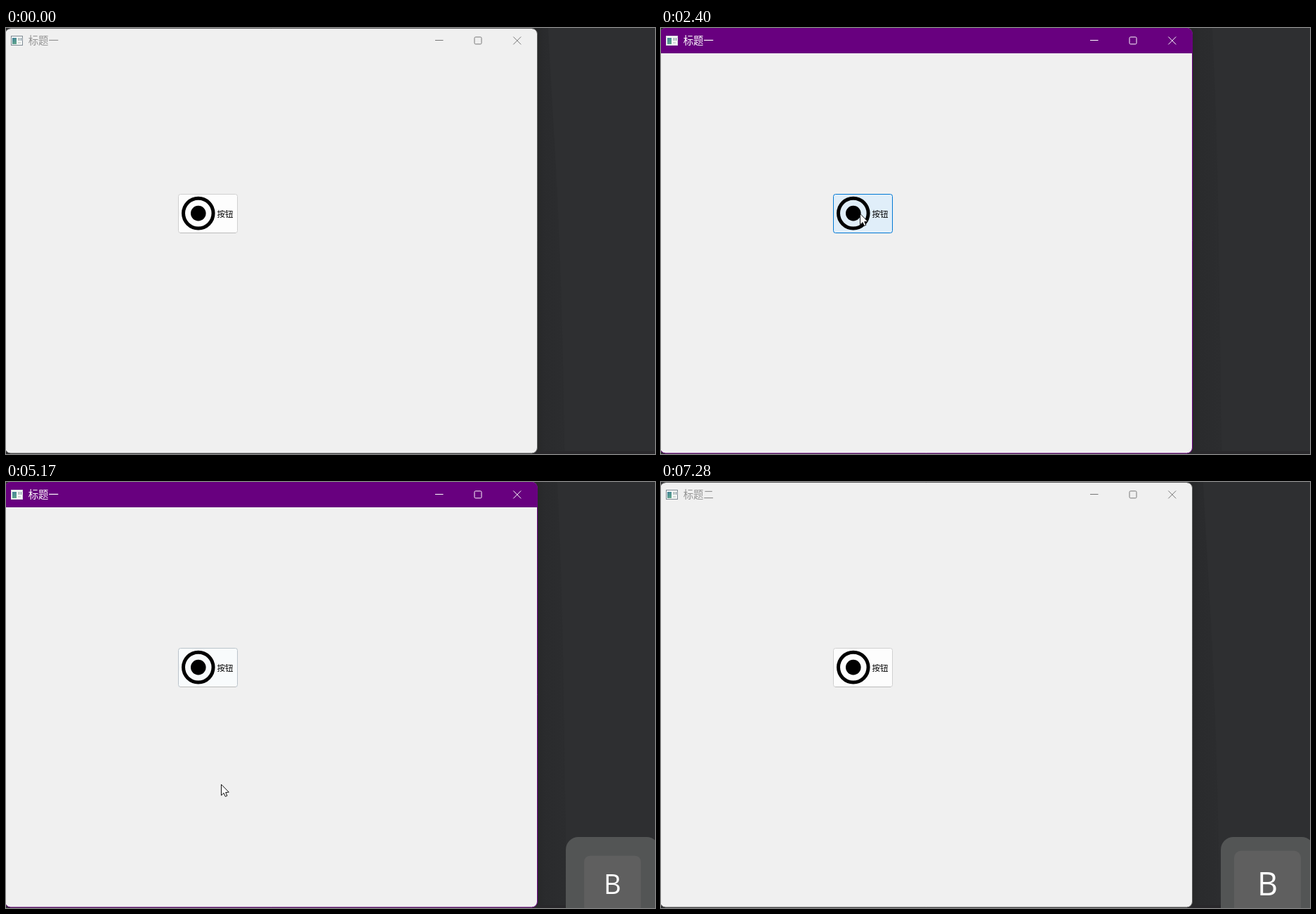
Write an HTML page with a canvas that moves like this. It is 924 px wide and 606 px high and loops after 7.3 s.

```html
<!DOCTYPE html>
<html lang="zh">
<head>
<meta charset="utf-8">
<style>
  html, body { margin: 0; width: 100%; height: 100%; overflow: hidden; background: #2e2f31; }
  canvas { display: block; }
</style>
</head>
<body>
<canvas id="stage" width="924" height="606"></canvas>
<script>
const ctx = document.getElementById('stage').getContext('2d');
const LOOP = 7300, ACTIVE_FROM = 1190, ACTIVE_TO = 7280;
const KEY_DOWN = 4810, KEY_UP = 6200;
const CJK = '"Noto Sans CJK SC", "Noto Sans CJK", sans-serif';

// Each click, including auto-repeats while held, swaps the title.
const clicks = [1700, 1760, 3230, 3330, 3440, 3570, 3670, 3820, 3920, 4010,
  4100, 4240, 4330, 4910, 5730, 5830, 5920, 6020, 6150, 6250, 6350];

const looks = {
  normal: { fill: [253, 253, 253], line: [208, 208, 208] },
  hover: { fill: [224, 238, 249], line: [0, 120, 212] },
  down: { fill: [204, 228, 247], line: [0, 84, 153] }
};

// Fade start, fade end, resulting look
const buttonFades = [
  [850, 1000, 'hover'], [1420, 1420, 'down'], [1760, 1760, 'hover'],
  [2930, 2930, 'down'], [4330, 4330, 'hover'], [4430, 4660, 'normal'],
  [4810, 4810, 'down'], [4910, 5200, 'normal'], [5400, 5550, 'down'],
  [6350, 6480, 'normal']
];

const pointerPath = [
  [330, 322, 588], [520, 296, 470], [710, 256, 350], [850, 243, 284],
  [1000, 284, 262], [2399, 284, 262], [2400, 283, 264], [2459, 283, 264],
  [2460, 281, 266], [2790, 281, 266], [3020, 284, 281], [3250, 282, 274],
  [4380, 282, 274], [4660, 306, 430], [6200, 306, 430], [6460, 322, 608]
];

const clamp = v => Math.max(0, Math.min(1, v));
const mix = (a, b, p) => a + (b - a) * p;
const rgb = c => `rgb(${c.map(Math.round).join()})`;

function box(x, y, w, h, r, fill, line) {
  ctx.beginPath();
  ctx.roundRect(x, y, w, h, r);
  if (fill) { ctx.fillStyle = fill; ctx.fill(); }
  if (line) { ctx.strokeStyle = line; ctx.stroke(); }
}

function rect(x, y, w, h, color) {
  ctx.fillStyle = color;
  ctx.fillRect(x, y, w, h);
}

function lines(color, ...segments) {
  ctx.strokeStyle = color;
  ctx.beginPath();
  for (const [x1, y1, x2, y2] of segments) {
    ctx.moveTo(x1, y1);
    ctx.lineTo(x2, y2);
  }
  ctx.stroke();
}

function text(str, x, y, font, color) {
  ctx.font = font;
  ctx.fillStyle = color;
  ctx.fillText(str, x, y);
}

function drawBackdrop(active) {
  rect(0, 0, 924, 606, '#2e2f31');
  const top = active ? 785 : 772, bottom = active ? 799 : 796;
  ctx.beginPath();
  ctx.moveTo(750, 0);
  ctx.lineTo(top, 0);
  ctx.bezierCurveTo(top + 8, 160, bottom - 5, 260, bottom, 606);
  ctx.lineTo(750, 606);
  const shade = ctx.createLinearGradient(756, 0, 800, 0);
  shade.addColorStop(0, '#272829');
  shade.addColorStop(0.25, '#2a2b2d');
  shade.addColorStop(1, '#2c2d2f');
  ctx.fillStyle = shade;
  ctx.fill();
  rect(750, 602, 174, 4, '#29282b');
}

function drawAppIcon(active) {
  rect(7, 11, 17, 14, active ? '#d9dfe2' : '#7f8b94');
  rect(8, 12, 15, 12, '#f4f6f6');
  const pane = ctx.createLinearGradient(9, 13, 15, 23);
  pane.addColorStop(0, '#3f7f9a');
  pane.addColorStop(1, '#63a88a');
  ctx.fillStyle = pane;
  ctx.fillRect(9, 14, 6, 9);
  rect(17, 14, 3, 4, '#b9c6c4');
  rect(21, 14, 1, 4, '#6d8794');
  rect(17, 20, 4, 2, '#d3dbd6');
}

function drawWindow(t, active) {
  const ink = active ? '#fff' : '#777';
  ctx.lineWidth = 1;
  box(-1, active ? 0 : 1, 757.5, active ? 605 : 604, 8, '#f0f0f0');
  ctx.save();
  ctx.clip();
  if (active) rect(-1, 0, 760, 36, '#68007f');
  ctx.restore();
  box(-1.5, 0.5, 758, 604.5, 8, null, active ? '#68007f' : '#5a5a5b');

  drawAppIcon(active);
  const odd = clicks.filter(c => c <= t).length % 2;
  text(odd ? '标题二' : '标题一', 31.7, 23, '14.4px ' + CJK, active ? '#fff' : '#939393');

  lines(ink, [611, 17.5, 622.5, 17.5]);
  box(667, 12.9, 10, 10, 1.5, null, ink);
  lines(ink, [722.3, 12.5, 733.2, 23.4], [733.2, 12.5, 722.3, 23.4]);
}

function buttonLook(t) {
  let { fill, line } = looks.normal;
  for (const [start, end, name] of buttonFades) {
    if (t < start) break;
    const p = end > start ? clamp((t - start) / (end - start)) : 1;
    const blend = (from, to) => from.map((v, i) => mix(v, to[i], p));
    fill = blend(fill, looks[name].fill);
    line = blend(line, looks[name].line);
  }
  return { fill, line };
}

function drawButton(t) {
  const { fill, line } = buttonLook(t);
  ctx.lineWidth = 1;
  box(245.5, 236.5, 84, 55, 3, rgb(fill), rgb(line));
  if (line[0] > 150) lines('#bbb', [248, 291.5, 327, 291.5]);

  ctx.lineWidth = 5;
  ctx.strokeStyle = ctx.fillStyle = '#000';
  ctx.beginPath();
  ctx.arc(273.8, 263.6, 21.3, 0, Math.PI * 2);
  ctx.stroke();
  ctx.beginPath();
  ctx.arc(273.8, 263.6, 10.8, 0, Math.PI * 2);
  ctx.fill();
  text('按钮', 300.4, 269.3, '11.5px ' + CJK, '#000');
}

function drawKey(t) {
  if (t < KEY_DOWN) return;
  const press = clamp((t - KEY_DOWN) / 120) * (1 - clamp((t - KEY_UP) / 120));
  const scale = mix(1, 0.85, press);
  box(797, 505, 133, 140, 18, '#535555');
  ctx.save();
  ctx.translate(863.5, 572);
  ctx.scale(scale, scale);
  box(-47.5, -47.5, 95, 95, 10, '#5f5f5f');
  ctx.textAlign = 'center';
  text('B', 0, 16, '45px "Open Sans", "Noto Sans", sans-serif', '#fff');
  ctx.restore();
}

function drawPointer(t) {
  const last = pointerPath.length - 1;
  if (t < pointerPath[0][0] || t >= pointerPath[last][0]) return;
  const i = pointerPath.findIndex(p => p[0] > t) - 1;
  const [t0, x0, y0] = pointerPath[i], [t1, x1, y1] = pointerPath[i + 1];
  // The pointer is sampled about 21 times a second.
  const held = t0 + Math.floor((t - t0) / 47) * 47;
  const p = (held - t0) / (t1 - t0);
  ctx.save();
  ctx.translate(Math.round(mix(x0, x1, p)) + 0.5, Math.round(mix(y0, y1, p)) + 0.2);
  ctx.beginPath();
  ctx.moveTo(0, 0);
  for (const [x, y] of [[0, 15.6], [3.6, 12.3], [5.8, 17.2], [8.3, 16.2], [6.2, 11.4], [10.8, 11]]) {
    ctx.lineTo(x, y);
  }
  ctx.closePath();
  ctx.lineWidth = 1;
  ctx.fillStyle = '#fff';
  ctx.strokeStyle = '#111';
  ctx.fill();
  ctx.stroke();
  ctx.restore();
}

const origin = performance.now();

function render() {
  const t = (performance.now() - origin) % LOOP;
  const active = t >= ACTIVE_FROM && t < ACTIVE_TO;
  drawBackdrop(active);
  drawWindow(t, active);
  drawButton(t);
  drawKey(t);
  drawPointer(t);
  requestAnimationFrame(render);
}
render();
</script>
</body>
</html>
```
